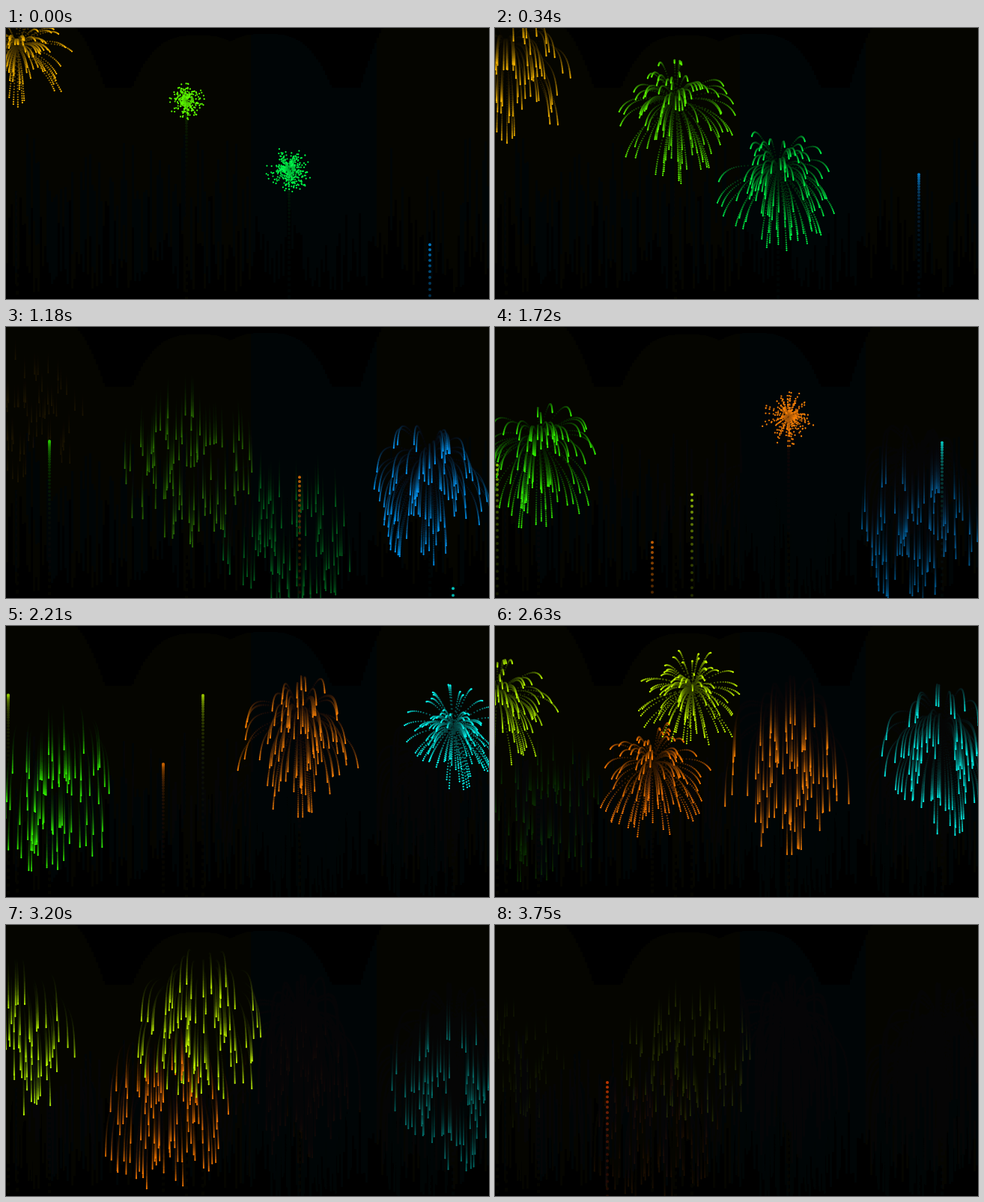
Write an HTML page with a canvas that moves like this. It is 645 by 363 pixels and loops after 3810 ms.

```html
<!DOCTYPE html>
<html lang="en">
<head>
<meta charset="utf-8">
<title>Fireworks</title>
<style>
  html, body { margin: 0; width: 100%; height: 100%; overflow: hidden; background: #000; }
  canvas { display: block; }
</style>
</head>
<body>
<canvas id="sky" width="645" height="363"></canvas>
<script>
const W = 645, H = 363, LOOP = 3810, FRAMES = 55, STEPS = 4, WARMUP = -90;
const GRAVITY = 0.2, DRAG = 0.9, LIFE = 63, SPARKS = 100;
const ctx = document.getElementById('sky').getContext('2d');

function seeded(seed) {
  return () => {
    seed = (seed + 0x6D2B79F5) | 0;
    let t = Math.imul(seed ^ (seed >>> 15), 1 | seed);
    t = (t + Math.imul(t ^ (t >>> 7), 61 | t)) ^ t;
    return ((t ^ (t >>> 14)) >>> 0) / 4294967296;
  };
}

// A rocket slows to a halt at its apex, then throws sparks every way
function shell(x, apex, burst, hue) {
  const rnd = seeded(x);
  const sparks = Array.from({ length: SPARKS }, () => {
    const angle = rnd() * Math.PI * 2, speed = 2 + rnd() * 8;
    return [Math.cos(angle) * speed, Math.sin(angle) * speed];
  });
  return { x, apex, burst, sparks, rocket: `hsl(${hue}, 100%, 38%)`, color: `hsl(${hue}, 100%, 49%)` };
}

const shells = [
  shell(15, 24, -16, 44),
  shell(241, 97, -2, 98),
  shell(378, 188, -3, 138),
  shell(566, 178, 33, 203),
  shell(58, 150, 73, 108),
  shell(392, 120, 96, 31),
  shell(597, 134, 114, 178),
  shell(3, 92, 130, 76),
  shell(263, 84, 137, 73),
  shell(210, 183, 132, 29),
  shell(150, 118, 246, 17)
];

function dot(g, x, y, r) {
  g.moveTo(x + r, y);
  g.arc(x, y, r, 0, Math.PI * 2);
}

function drawShell({ x, apex, burst, sparks, rocket, color }, step) {
  const age = step - burst + 1;
  if (age > LIFE) return;
  ctx.beginPath();
  if (age < 1) {
    const left = 1 - age;
    ctx.fillStyle = rocket;
    const y = apex + GRAVITY / 2 * left * (left + 1);
    if (y <= H) dot(ctx, x, y, 2);
  } else {
    const fall = GRAVITY / (1 - DRAG);
    const reach = DRAG / (1 - DRAG) * (1 - DRAG ** age);
    ctx.fillStyle = color;
    for (const [vx, vy] of sparks)
      dot(ctx, x + vx * reach, apex + fall * age + (vy - fall) * reach, 1.15);
  }
  ctx.fill();
}

// Faint soot of earlier shells: domes on top, ragged streaks below
function makeSoot() {
  const layer = document.createElement('canvas');
  layer.width = W;
  layer.height = H;
  const g = layer.getContext('2d'), rnd = seeded(5);
  const domes = [[30, -25], [255, 10], [345, 8], [580, -50]];
  const top = x => Math.min(80, ...domes.map(([cx, y]) => y + 75 * Math.abs((x - cx) / 90) ** 3));
  const warm = 'rgb(5,5,0)', cold = 'rgb(0,5,6)';
  for (let x = 0; x < W; x += 3) {
    const y = Math.round(top(x)), end = Math.round(225 + rnd() * 130);
    g.fillStyle = Math.abs(x - 410) < 85 ? cold : warm;
    g.fillRect(x, y, 3, end - y);
    if (rnd() < 0.45) {
      g.fillStyle = cold;
      g.fillRect(x, 140 + Math.round(rnd() * 100), 3, 110);
    }
  }
  return layer;
}
const soot = makeSoot();

function advance(step) {
  ctx.fillStyle = 'rgba(0, 0, 0, 0.098)';
  ctx.fillRect(0, 0, W, H);
  for (const s of shells) drawShell(s, step);
}

let drawn = Infinity;
function show(step) {
  if (step === drawn) return;
  if (step < drawn) {
    ctx.fillStyle = '#000';
    ctx.fillRect(0, 0, W, H);
    drawn = WARMUP;
  }
  while (drawn < step) advance(++drawn);
  ctx.globalCompositeOperation = 'lighten';
  ctx.drawImage(soot, 0, 0);
  ctx.globalCompositeOperation = 'source-over';
}

function tick() {
  const t = performance.now() % LOOP;
  const frame = Math.min(FRAMES - 1, Math.floor((t + 15) * FRAMES / LOOP));
  show(frame * STEPS);
  requestAnimationFrame(tick);
}
tick();
</script>
</body>
</html>
```
